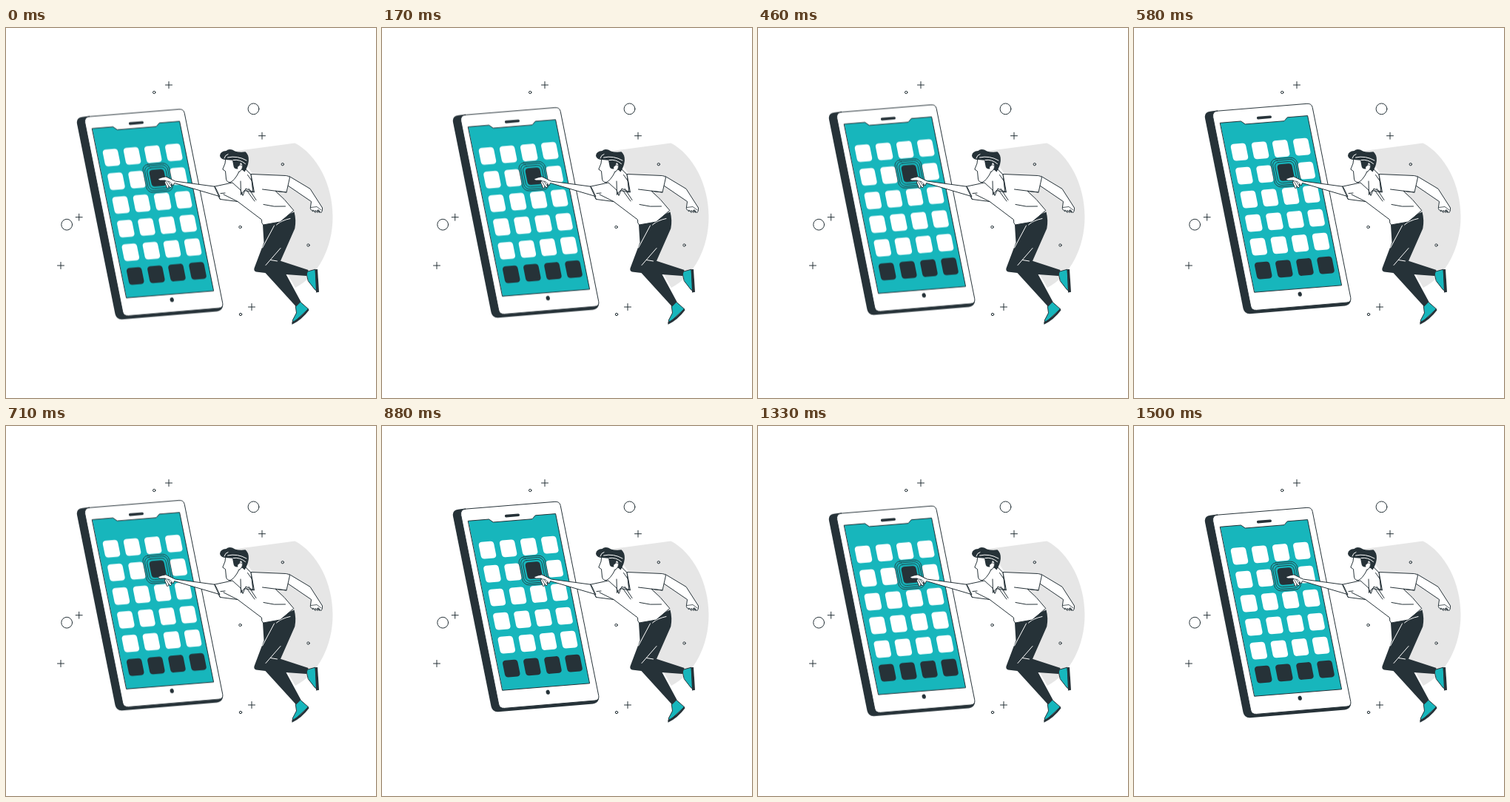
Write an HTML page that moves like this. It is 500 px wide and 500 px high and loops after 1.54 s.

```html
<!DOCTYPE html>
<html lang="en">
<head>
<meta charset="utf-8">
<title>Phone tap</title>
<style>
  html, body { margin: 0; width: 100%; height: 100%; overflow: hidden; background: #fff; }
  svg { display: block; width: 100%; height: 100%; }
  .ink { fill: none; stroke: #263238; stroke-width: 1; stroke-linecap: round; stroke-linejoin: round; }
  .paper { fill: #fff; }
  .dark { fill: #263238; }
  .teal { fill: #17b6bc; }
  .light { fill: none; stroke: #fff; stroke-width: 1; stroke-linecap: round; stroke-linejoin: round; }
  .fine { stroke-width: .8; }
  #phone { animation: float 1540ms linear -40ms infinite; }
  @keyframes float {
    0%, 100% { transform: translateY(0); }
    50% { transform: translateY(-10px); }
  }
</style>
</head>
<body>
<svg viewBox="0 0 500 500" xmlns="http://www.w3.org/2000/svg">
  <defs>
    <path id="plus" d="M-4.5 0H4.5M0-4.5V4.5"/>
    <circle id="dot" r="1.7"/>
    <circle id="ring" r="7.4"/>
  </defs>

  <path fill="#e6e6e6" d="M312 166L390.5 155.5C421 172 441.5 212 441.5 255C441.5 296 423 334 391 351L362 300V240Z"/>

  <g class="ink">
    <use href="#plus" x="220" y="77"/>
    <use href="#plus" x="346" y="145.7"/>
    <use href="#plus" x="98.7" y="255.7"/>
    <use href="#plus" x="74" y="321"/>
    <use href="#plus" x="332" y="377"/>
    <use href="#dot" x="200.2" y="87"/>
    <use href="#dot" x="373.8" y="184.2"/>
    <use href="#dot" x="316.5" y="269"/>
    <use href="#dot" x="408.5" y="293.5"/>
    <use href="#dot" x="317" y="387"/>
    <use href="#ring" x="334.5" y="109.3"/>
    <use href="#ring" x="82.2" y="265.7"/>
  </g>

  <g id="phone">
    <path class="dark" d="M112 119.5L103 120.7Q94.5 122 96 130L147.5 387Q149.5 394.8 157 394.2L285 383.4Q291 382.8 293 377L240 200Z"/>
    <path class="paper ink" d="M112.5 120.2L234 110.3Q240 109.9 241.2 115.5L292.8 372.5Q293.8 378.3 288 379L165.5 389.4Q159 389.8 157.7 384L106.7 128.5Q105.5 121 112.5 120.2Z"/>
    <path class="teal ink" d="M116.6 136.3L144.5 134L150.3 138L203 133.7L207.3 128.8L234.6 126.6L280.6 355.8L163 365.2Z"/>
    <path class="ink" style="stroke-width:3.6" d="M167.7 129.6L184.2 128.2"/>
    <ellipse class="dark" cx="224.2" cy="367.7" rx="2.6" ry="3.1" transform="rotate(-12 224.2 367.7)"/>
    <g id="icons"></g>
  </g>

  <!-- far arm -->
  <path class="paper ink" d="M383 200.5L411 217.3L427.5 243Q428 248 425.5 249.8L422 245.5L423.5 249.5L420.5 246L421 249.5L417.8 246.3L418 249.5L414.8 245.8L415 248Q411.5 246 411.3 243.5L412.5 234.5L378 211Z"/>
  <path class="ink fine" d="M412 242.5L420 241.5L426 246"/>

  <!-- shoes -->
  <path class="teal ink" d="M406 329.5L418 326.2L420.5 356L417 353L408.5 342Z"/>
  <path class="dark" d="M417.6 326.3L421 326L423 356.8L419 357.5Z"/>
  <path class="teal ink" d="M397.5 370L408.5 379.7L387.5 399L387.3 395L392.5 385L391.3 376Z"/>
  <path class="dark" d="M408.2 379L409.5 381.2Q400 394 386.5 400.8L386.3 397.5Q399 391 408.2 379Z"/>

  <!-- trousers -->
  <path class="dark" d="M347 266L389.5 248.5Q392.5 260 390.3 271L371 314.8L408.5 327L406 335L378.5 333L398.5 370L392 376.5L350.5 331L338 329.5Q334.5 328.5 335.5 324.5L348.5 290Z"/>
  <path class="light" d="M362.5 267L346.5 297M371 297.5L351 320.5M357.5 313.5L366.5 315M365.5 266Q372 260 384 257.5"/>

  <!-- neck and shirt -->
  <path class="paper ink" d="M303 208.5L314 193L323 190L331 198L334 222L318 226Z"/>
  <path class="paper ink" d="M281.5 214.2L306 209L317 219L320 226.5L324 217L335.5 222L331 197.5L378.5 199.5Q382 199.8 383.5 202L379 222L364 220.3L376 231.5L388.8 246.5Q380 254 370.5 262L347.5 266Q345 264 345.5 259L313 234.5L289.5 231.5Z"/>
  <path class="ink" d="M290 223.5L296 223M294 225L313 234.5M346.5 218L379 222M348 238.5Q362 242.5 377.5 241M325 219L336 234M328 217L338 232.5M317 207L317.5 225.5L322 219.5L334 222L332.5 207L326.5 198.5"/>

  <!-- head -->
  <path class="paper ink" d="M297 174L296 183L292.8 191L296.5 193.5L297.5 204Q298.5 209 303 208.6Q309 206 314.5 195L321 189L322 174Z"/>
  <path class="dark" d="M289 172.5Q289.5 166.5 297.5 166Q302 161.8 309.5 166.5Q316 168.5 323.5 167.3Q328.5 171.5 327.8 180Q327 187 322.5 194.5L318.5 191Q321 184 317 182L313.5 190.5Q308 191 307.5 186.5L306 178.8L294.5 177.8Q289.5 176.5 289 172.5Z"/>
  <path class="light" d="M295 176Q296 171.5 300 170.5M299.5 175Q313 172 325 179M307 178.5Q316 177 323.5 183.5"/>
  <path class="paper ink fine" d="M313 187.5Q318.5 182 319.5 187.5Q319 193 314 194.5"/>

  <!-- reaching arm -->
  <path class="paper ink" d="M282 214.2L228.5 207L216 200.8Q210 202 206.3 203.5Q205 205.8 208.5 206L215.5 206L214.5 209Q216.5 213 217.5 216.3Q220 217 220 213.5L222 216Q224.5 215.5 223.5 211L226 213L227.5 209.5L288.5 227.5Z"/>
  <path class="ink fine" d="M214.5 206.5L221 207.5L224.5 211M217 208.5L219.8 213.5M219.5 208L223 213"/>
  <path class="ink" d="M281.5 214.2L289.5 231.5"/>
</svg>
<script>
  const icons = document.getElementById('icons');

  // Rounded tile sheared to the phone's perspective.
  function tile(col, row, w, h, r, style) {
    const x = 142.5 + 28.1 * col + 6.45 * row;
    const y = 175.6 - 2.3 * col + 32 * row;
    const el = document.createElementNS('http://www.w3.org/2000/svg', 'rect');
    const attrs = {
      x: -w / 2, y: -h / 2, width: w, height: h, rx: r, class: style,
      transform: `matrix(1 -.085 .2 1 ${x} ${y})`
    };
    for (const key in attrs) el.setAttribute(key, attrs[key]);
    icons.append(el);
  }

  for (let row = 0; row < 6; row++)
    for (let col = 0; col < 4; col++)
      tile(col, row, 20.5, 22.7, 4.3, row === 5 ? 'dark' : 'paper');

  // Highlighted icon with its press rings.
  tile(2, 1, 35.5, 38, 8, 'ink fine');
  tile(2, 1, 31, 33.5, 7, 'ink fine teal');
  tile(2, 1, 25.5, 28, 5.5, 'ink fine teal');
  tile(2, 1, 20, 22.3, 4.3, 'dark');
</script>
</body>
</html>
```
